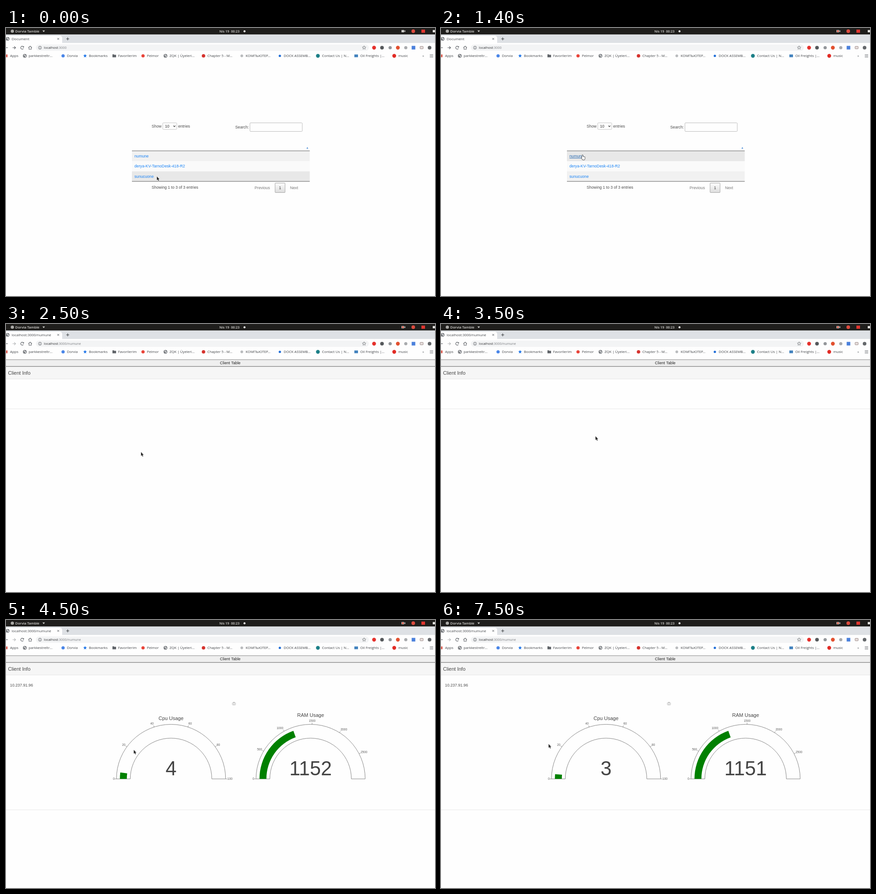
These frames come from a looping animation (947x592 px, 8000 ms). An HTML page with a canvas:

```html
<!DOCTYPE html>
<html lang="en">
<head>
<meta charset="utf-8">
<title>Client monitor</title>
<style>
  html, body { margin: 0; width: 100%; height: 100%; overflow: hidden; background: #fefefe; }
  canvas { display: block; }
</style>
</head>
<body>
<canvas id="stage" width="947" height="592"></canvas>
<script>
const ctx = document.getElementById('stage').getContext('2d');
const LOOP = 8000;
const SANS = '"Liberation Sans", Arial, sans-serif';
const UI = '"Open Sans", "Noto Sans", sans-serif';
const PAGE = '#fefefe', GREY = '#5f6368', LINK = '#1a83f5';
const HOST = 'localhost', PORT = ':3000', CLIENT = 'numune';

// Pointer path: time, x, y
const path = [
  [300, 333, 328], [400, 330, 322], [600, 300, 262], [700, 275, 230], [800, 265, 240],
  [1000, 300, 280], [1100, 300, 280], [1200, 306, 294], [1400, 310.5, 280],
  [1500, 340, 245], [1600, 320, 211], [1700, 280, 228], [1800, 258, 262],
  [2000, 298, 283], [3100, 298, 283], [3500, 341, 248], [3700, 344, 256],
  [3800, 344, 256], [4100, 321, 268], [4500, 282, 287], [4800, 282, 287], [5000, 237.5, 274]
];

function box(x, y, w, h, color) {
  ctx.fillStyle = color;
  ctx.fillRect(x, y, w, h);
}

function dot(x, y, r, color) {
  ctx.fillStyle = color;
  ctx.beginPath();
  ctx.arc(x, y, r, 0, Math.PI * 2);
  ctx.fill();
}

function arc(x, y, r, from, to, color, width = 1) {
  ctx.strokeStyle = color;
  ctx.lineWidth = width;
  ctx.beginPath();
  ctx.arc(x, y, r, from, to);
  ctx.stroke();
}

const ring = (x, y, r, color, width) => arc(x, y, r, 0, Math.PI * 2, color, width);

function trace(pts) {
  ctx.beginPath();
  for (let i = 0; i < pts.length; i += 2) ctx.lineTo(pts[i], pts[i + 1]);
}

function line(pts, color, width = 1) {
  trace(pts);
  ctx.strokeStyle = color;
  ctx.lineWidth = width;
  ctx.stroke();
}

function poly(pts, color) {
  trace(pts);
  ctx.closePath();
  ctx.fillStyle = color;
  ctx.fill();
}

function rounded(x, y, w, h, r, color) {
  ctx.beginPath();
  ctx.roundRect(x, y, w, h, r);
  ctx.fillStyle = color;
  ctx.fill();
}

function frame(x, y, w, h, r, stroke, fill) {
  rounded(x, y, w, h, r, fill);
  ctx.strokeStyle = stroke;
  ctx.lineWidth = 1;
  ctx.stroke();
}

// y is the middle of the capitals
function label(str, x, y, size, color, { align = 'left', font = SANS, weight = 400 } = {}) {
  ctx.font = `${weight} ${size}px ${font}`;
  ctx.textAlign = align;
  ctx.fillStyle = color;
  ctx.fillText(str, x, y + size * 0.36);
  return ctx.measureText(str).width;
}

const ui = (str, x, y, size, color, weight) => label(str, x, y, size, color, { font: UI, weight });

function globe(x, y) {
  ring(x, y, 3.4, GREY, 1.3);
  poly([x - 3, y - 1, x, y - 0.5, x + 1, y + 1, x - 1, y + 3], GREY);
  poly([x, y - 3, x + 3, y - 1, x + 1, y - 0.5], GREY);
}

function star(x, y, r, color, filled) {
  const pts = [];
  for (let i = 0; i <= 10; i++) {
    const a = i * Math.PI / 5 - Math.PI / 2, d = i % 2 ? r * 0.45 : r;
    pts.push(x + d * Math.cos(a), y + d * Math.sin(a));
  }
  filled ? poly(pts, color) : line(pts, color, 0.8);
}

function topBar(t) {
  box(0, 0, 947, 14.5, '#1f1e1c');
  dot(14, 7, 3.6, '#aaa9a6');
  ui('Dorvia Tamble', 20.5, 7.2, 7.7, '#d8d7d4', 600);
  poly([80.5, 5.5, 86, 5.5, 83.2, 9], '#d8d7d4');
  ui('Nis 19  00:23', 471, 7.2, 7.4, '#d8d7d4', 600);
  dot(526.5, 7.2, 2.2, '#f2f2f0');
  box(873, 4.5, 6, 5, '#cfcecb');
  poly([879, 7, 881.5, 4.8, 881.5, 9.3], '#cfcecb');
  if (t >= 100) dot(876, 7, 2, '#e0523f');
  dot(899, 7, 4, '#dd4b3e');
  box(917, 3.5, 8, 7, '#e2352f');
  box(942, 4.5, 5, 5, '#e8e7e4');
}

function tabs(t, loading, opened) {
  box(0, 14.5, 947, 18.5, '#dee1e5');
  rounded(-8, 17, 132, 18, [5, 5, 0, 0], PAGE);
  if (loading) arc(3, 24, 4, t / 160, t / 160 + 2, '#3f7fe0', 1.2);
  else globe(3.5, 24);
  ui(opened ? `${HOST}${PORT}/${CLIENT}` : 'Document', 12.5, 24, opened ? 7.9 : 8, '#44474b');
  line([113.3, 22, 117.3, 26], GREY, 1);
  line([117.3, 22, 113.3, 26], GREY, 1);
  line([133, 24, 139.5, 24], '#3c4043', 1.1);
  line([136.2, 20.8, 136.2, 27.2], '#3c4043', 1.1);
}

function toolbar(loading, opened) {
  const fwd = opened ? '#b4b6b8' : GREY;
  line([0, 43.5, 4, 43.5], GREY, 1.1);
  line([14.5, 43.5, 21, 43.5], fwd, 1.1);
  line([18, 40.3, 21.3, 43.5, 18, 46.7], fwd, 1.1);
  if (loading) {
    line([32.8, 40.5, 38.8, 46.5], GREY, 1.1);
    line([38.8, 40.5, 32.8, 46.5], GREY, 1.1);
  } else {
    arc(35.8, 43.5, 3.2, 0.5, 5.5, GREY, 1.1);
    poly([39.6, 39.8, 39.6, 43, 36.4, 43], GREY);
  }
  line([49.5, 43.5, 53.3, 40, 57.2, 43.5], GREY, 1.1);
  line([50.8, 43, 50.8, 47, 55.8, 47, 55.8, 43], GREY, 1.1);
  rounded(66, 36.5, 735, 14, 7, '#f3f4f5');
  ring(75, 43.5, 3.4, GREY, 0.9);
  box(74.5, 43, 1, 2.6, GREY);
  box(74.5, 41.2, 1, 1, GREY);
  const w = ui(HOST, 83.8, 43.3, 7.4, '#2c2e31');
  ui(PORT + (opened ? '/' + CLIENT : ''), 83.8 + w, 43.3, 7.4, '#7c7f83');

  star(790.5, 43.5, 4.2, GREY, false);
  dot(812.5, 43.5, 4.2, '#e5302b');
  dot(830, 43.5, 4, '#55585b');
  dot(848, 43.5, 3.6, '#93969a');
  dot(865, 43.5, 4.2, '#e2502f');
  dot(882.5, 43.5, 3.5, '#a9abae');
  box(895.5, 39.5, 8, 8, '#4a80dc');
  frame(914, 40.5, 7, 5.5, 1, '#a08f8d', '#e4dcda');
  dot(935, 43.5, 4, '#65686b');
}

function bookmarks() {
  const y = 61.5;
  const names = [
    ['Apps', 9], ['parkkestreltr...', 50], ['Dorvia', 134.5], ['Bookmarks', 183], ['Favorilerim', 247.5],
    ['Pelmor', 311], ['ZQK | Üyeleri...', 361], ['Chapter 5 - M...', 444.5], ['КОМПЬЮТЕР...', 529],
    ['DOCK ASSEMB...', 613], ['Contact Us | N...', 697.5], ['Oil Freights |...', 782], ['music', 866]
  ];
  for (const [name, x] of names) ui(name, x, y, 7.8, '#404347');
  box(0, 58.5, 3.5, 6, '#e0685d');
  globe(41.5, y);
  dot(126, y, 3.6, '#4a86e8');
  star(174.5, y, 4.2, '#1a73e8', true);
  box(235, 58.2, 3.5, 2, GREY);
  box(235, 59.2, 8, 5.5, GREY);
  dot(302.5, y, 3.6, '#e9453a');
  globe(352, y);
  dot(436, y, 3.8, '#d5322d');
  dot(520.5, y, 3, '#b9bbbd');
  dot(604.5, y, 2.6, '#2470d8');
  dot(688.5, y, 4.2, '#1c7f87');
  box(769, 58.5, 8, 6, '#4181bd');
  dot(857, y, 4.2, '#e12b25');
  ui('»', 919, y - 0.5, 8, GREY);
  for (let i = 0; i < 3; i++) box(935.5, 58 + i * 2.8, 7.5, 1.6, '#a4a6a9');
}

function listPage(hover, onLink) {
  const ink = '#4b4b4b', size = 8.7;
  label('Show', 321.5, 217, size, ink);
  frame(346, 209.5, 31, 14.5, 1.5, '#c4c4c4', PAGE);
  label('10', 351, 217, size, '#333');
  line([369.5, 215.7, 371.7, 218.2, 373.9, 215.7], '#333', 1.2);
  label('entries', 380, 217, size, ink);
  label('Search:', 506, 218.5, size, ink);
  frame(538.5, 209.5, 115.5, 19, 1.5, '#bcbcbc', PAGE);
  poly([663.2, 266.5, 667.2, 266.5, 665.2, 263], '#4d8fd6');

  const rows = [CLIENT, 'derya-KV-TarnoDesk-418-R2', 'sunucuone'];
  rows.forEach((name, i) => {
    const even = i % 2;
    box(278, 272 + i * 22.3, 392.5, 22.3, hover === i ? (even ? '#f3f3f3' : '#e8e8e8') : (even ? '#fafafa' : '#f1f1f1'));
    const active = onLink && i === 0;
    const color = active ? '#2467b0' : LINK;
    const w = label(name, 283.5, 283 + i * 22.3, size, color);
    if (active) box(283.5, 287, w, 0.9, color);
  });
  box(278, 270.7, 392.5, 1.4, '#8a8a8a');
  box(278, 338.2, 392.5, 1.2, '#777');

  label('Showing 1 to 3 of 3 entries', 321.5, 352.3, size, ink);
  label('Previous', 548.7, 352.7, size, '#777');
  const shade = ctx.createLinearGradient(0, 342, 0, 364);
  shade.addColorStop(0, '#fdfdfd');
  shade.addColorStop(1, '#dcdcdc');
  frame(594, 342.5, 22, 21, 1, '#a5a5a5', shade);
  label('1', 605, 352.7, size, '#333', { align: 'center' });
  label('Next', 627, 352.7, size, '#777');
}

function gauge(cx, title, titleY, value, lo, hi, step) {
  const cy = 351, R = 120.5, mid = { align: 'center' };
  const angle = v => Math.PI * (1 + (v - lo) / (hi - lo));
  ctx.beginPath();
  ctx.arc(cx, cy, R, Math.PI, 0);
  ctx.arc(cx, cy, 90, 0, Math.PI, true);
  ctx.closePath();
  ctx.strokeStyle = '#858585';
  ctx.lineWidth = 1;
  ctx.stroke();

  if (angle(value) > Math.PI) {
    ctx.beginPath();
    ctx.arc(cx, cy, 112.9, Math.PI, angle(value));
    ctx.arc(cx, cy, 97.6, angle(value), Math.PI, true);
    ctx.closePath();
    ctx.fillStyle = '#008000';
    ctx.fill();
  }

  for (let v = lo; v <= hi; v += step) {
    const c = Math.cos(angle(v)), s = Math.sin(angle(v));
    line([cx + R * c, cy + R * s, cx + (R + 3.5) * c, cy + (R + 3.5) * s], '#777', 0.8);
    const align = Math.abs(c) < 0.1 ? 'center' : c < 0 ? 'right' : 'left';
    label(String(v).replace('-', '−'), cx + 124.5 * c, cy + 128.5 * s, 6.6, '#5a5a5a', { align });
  }
  label(title, cx, titleY, 11, '#444', mid);
  label(String(value), cx, 327, 43.7, '#444', mid);
}

function clientPage(t) {
  const ready = t >= 3600, live = t >= 4500;
  box(0, 79, 947, 15, '#efefef');
  box(0, 78.3, 947, 1, '#868686');
  box(0, 93.3, 947, 1.2, '#555');
  label('Client Table', 495, 86, 8.7, '#222', { align: 'center' });
  box(0, 94.5, 947, 26.5, '#f6f6f6');
  box(0, 121, 947, 1, '#e6e6e6');
  label('Client Info', 4.5, 107.7, 11, '#444');
  box(0, ready ? 418.8 : 186.8, 947, 1, '#e8e8e8');
  if (!ready) return;

  label(live ? '10.237.91.96' : '0.0.0.0', 8.8, 143.7, 8.7, '#4b4b4b');
  frame(499.7, 182.7, 7, 5, 1, '#b5b5b5', PAGE);
  box(501.7, 181, 3, 1.5, '#b5b5b5');
  ring(503.2, 185.3, 1.3, '#b5b5b5', 0.8);

  const cpu = live ? [4, 3, 2, 3][Math.floor((t - 4500) / 1000)] : 0;
  gauge(364.3, 'Cpu Usage', 216.8, cpu, 0, 100, 20);
  if (live) gauge(672.4, 'RAM Usage', 210.3, t < 7500 ? 1152 : 1151, 0, 2950, 500);
  else gauge(672.4, 'RAM Usage', 210.3, 0, -1, 1, 0.5);
}

function pointerAt(t) {
  const i = path.findIndex(p => p[0] > t);
  if (i === 0) return path[0].slice(1);
  if (i < 0) return path[path.length - 1].slice(1);
  const [t0, x0, y0] = path[i - 1], [t1, x1, y1] = path[i];
  const k = (t - t0) / (t1 - t0);
  return [x0 + (x1 - x0) * k, y0 + (y1 - y0) * k];
}

function pointer(x, y, hand) {
  ctx.save();
  ctx.translate(x, y);
  ctx.lineJoin = 'round';
  const shape = hand
    ? [1, 0.5, 2.3, 0.5, 2.5, 4, 7, 5, 7.2, 8, 6, 11, 2.5, 11, -0.5, 7, 0.8, 6.5, 1, 0.5]
    : [0, 0, 0, 8.3, 1.9, 6.6, 3.3, 9.8, 4.8, 9.1, 3.4, 6.1, 5.8, 5.9, 0, 0];
  line(shape, hand ? '#333' : '#f4f4f4', 1.5);
  poly(shape, hand ? '#fff' : '#2b2b2b');
  ctx.restore();
}

function draw(time) {
  const t = Math.floor((time % LOOP) / 100) * 100;
  const opened = t >= 2100, page = t >= 2500, loading = opened && !page;
  const [x, y] = pointerAt(t);
  const onLink = !page && x >= 283 && x <= 316 && y >= 276 && y <= 290;
  const hover = t >= 1000 ? 0 : Math.floor((y - 272) / 22.3);

  box(0, 0, 947, 592, PAGE);
  if (page) clientPage(t);
  else listPage(hover, onLink);
  topBar(t);
  tabs(t, loading, opened);
  toolbar(loading, opened);
  bookmarks();
  pointer(x, y, onLink && t < 2200);
}

const start = performance.now();
function tick() {
  draw(performance.now() - start);
  requestAnimationFrame(tick);
}
tick();
</script>
</body>
</html>
```
